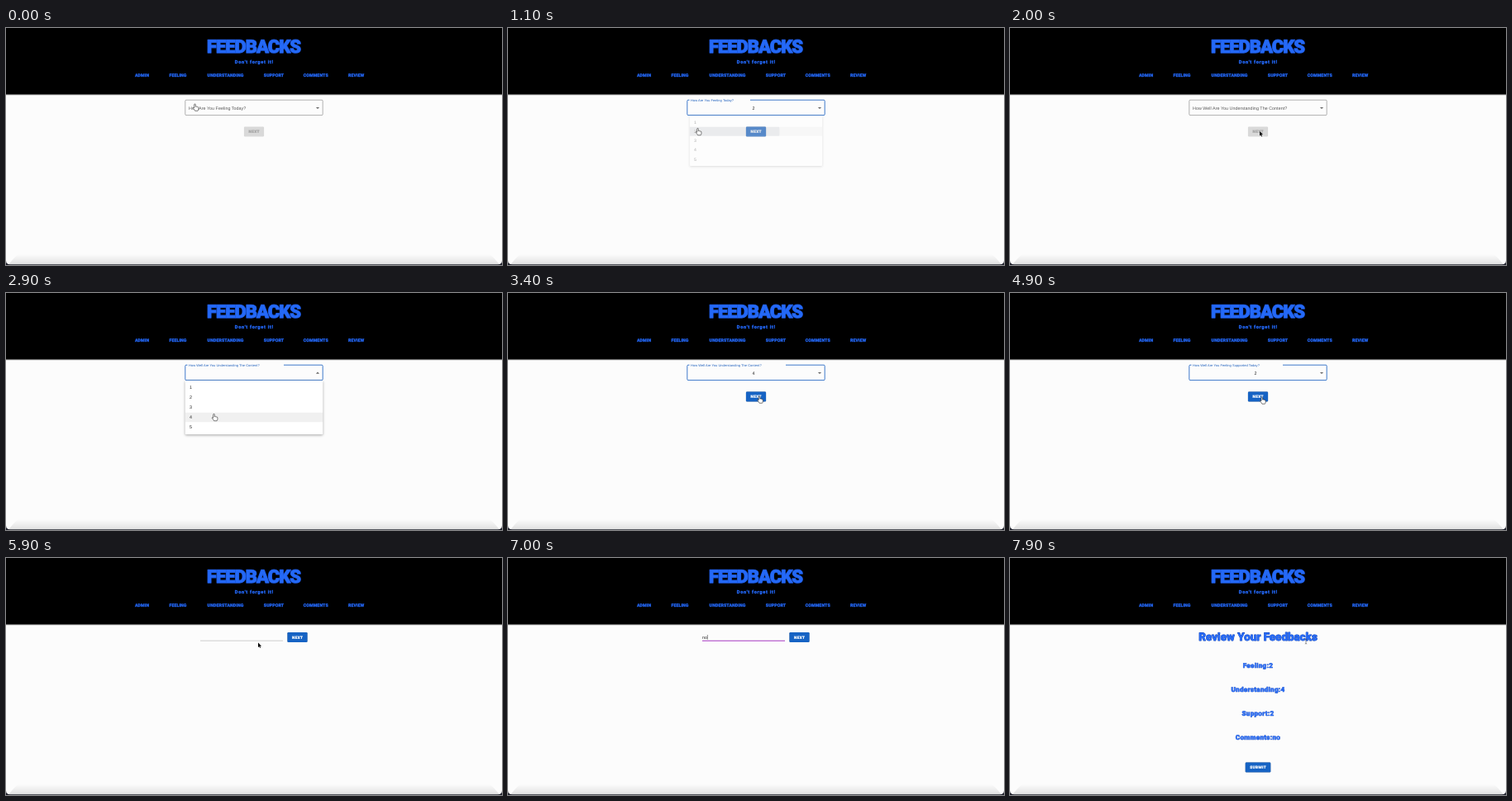
Animation of 600 by 287 pixels, one loop 8 s. Source, as an HTML page:

```html
<!DOCTYPE html>
<html lang="en">
<head>
<meta charset="utf-8">
<title>Feedbacks</title>
<style>
  html, body { margin: 0; width: 100%; height: 100%; overflow: hidden; background: #fcfcfc; }
  svg { display: block; text-rendering: geometricPrecision; }
  text { font: 5.33px "Liberation Sans", Arial, sans-serif; letter-spacing: .05px; }
  .fun { font-family: Roboto, "Open Sans", sans-serif; font-weight: 900; fill: #2469f7;
         stroke: #1c55d6; stroke-width: .3; stroke-linejoin: round; paint-order: stroke; text-anchor: middle; }
  .title { font-size: 22px; letter-spacing: -1px; stroke-width: 1.3; }
  .sub { font-size: 5.6px; letter-spacing: .7px; }
  .nav { font-size: 5.2px; letter-spacing: .12px; }
  .head { font-size: 13.4px; letter-spacing: 0; stroke: #1545b4; stroke-width: .8; }
  .line { font-size: 8.1px; letter-spacing: .28px; stroke: #1545b4; stroke-width: .5; }
  .btn text { font-size: 4.67px; letter-spacing: .4px; fill: #fff; stroke: #fff; stroke-width: .2; }
  .btn rect { fill: #1663c4; filter: drop-shadow(0 .6px .6px rgba(0, 0, 0, .4)); }
  .btn.off rect { fill: #d9d9d9; filter: none; }
  .btn.off text { fill: #a3a3a3; stroke: #a3a3a3; }
  #paper { fill: #fff; filter: drop-shadow(0 1.5px 1.6px rgba(0, 0, 0, .36)); }
</style>
</head>
<body>
<svg id="stage" viewBox="0 0 600 287" width="100%" height="100%">
  <defs>
    <linearGradient id="dock" x2="0" y2="1">
      <stop offset="0" stop-color="#000" stop-opacity="0"/>
      <stop offset="1" stop-color="#000" stop-opacity=".11"/>
    </linearGradient>
    <linearGradient id="edge" x2="0" y2="1">
      <stop offset="0" stop-color="#000" stop-opacity=".45"/>
      <stop offset="1" stop-color="#000" stop-opacity="0"/>
    </linearGradient>
  </defs>
  <rect width="600" height="287" fill="#20222e"/>
  <path d="M0 0H600V281.5Q600 286.3 595 286.3H5Q0 286.3 0 281.5Z" fill="#fcfcfc"/>
  <path d="M14 274H586L597 286.3H3Z" fill="url(#dock)"/>
  <rect y="80" width="600" height="2" fill="url(#edge)"/>
  <rect width="600" height="80.4"/>
  <g id="header">
    <text class="fun title" x="299.5" y="29.6">FEEDBACKS</text>
    <text class="fun sub" x="300.3" y="42.8">Don't forget it!</text>
  </g>

  <g id="rating">
    <path id="frame" fill="none"/>
    <text id="label"></text>
    <text id="value" x="297" y="98.6" text-anchor="middle" fill="#222"></text>
    <path id="caretDown" d="M-2.1 -.9H2.1L0 1.2Z" fill="#666"/>
    <g id="rateBtn" class="btn"></g>
    <g id="menu">
      <rect id="paper" x="216.7" y="106" width="166.6" height="65.2" rx="1.3"/>
      <svg id="row" x="216.7" width="166.6" height="12">
        <rect width="167" height="12" fill-opacity=".06"/>
        <circle id="ripple" cy="6" fill="#0a1a3a" fill-opacity=".16"/>
      </svg>
    </g>
  </g>

  <g id="comments">
    <path d="M235 100.2H335" stroke="#8a8a8a" stroke-width=".4"/>
    <path id="underline" stroke="#b53cd2" stroke-width=".9"/>
    <text id="typed" x="235" y="97.6" fill="#222"></text>
    <path id="bar" stroke="#222" stroke-width=".5"/>
    <g id="sendBtn" class="btn"></g>
  </g>

  <g id="review">
    <text class="fun head" x="300" y="100.3">Review Your Feedbacks</text>
    <g id="submitBtn" class="btn"></g>
  </g>

  <g id="cursor">
    <path id="hand" fill="#fff" stroke="#222" stroke-width=".6" stroke-linejoin="round"
      d="M-.8 .8Q-.8 0 0 0Q.8 0 .8 .8V3.2Q1.6 2.7 2.1 3.3Q3 3 3.3 3.7Q4.4 3.5 4.4 4.6V6Q4.4 7.2 3.6 8.3H.1Q-.6 7 -1.9 5.4Q-2.6 4.6 -2 4.2Q-1.4 4 -.8 4.8Z"/>
    <path id="arrow" d="M0 0V5.6L1.3 4.4L2.2 6.4L3.1 6L2.2 4.1H4Z" stroke="#fff" stroke-width=".5" paint-order="stroke"/>
    <path id="beam" d="M-1.2 -3Q0 -3 0 -2.2Q0 -3 1.2 -3M0 -2.2V2.2M-1.2 3Q0 3 0 2.2Q0 3 1.2 3" fill="none" stroke="#333" stroke-width=".5"/>
  </g>
</svg>
<script>
const LOOP = 8000, STEP = 100;
const COMMENTS = 5100, FOCUS = 6300, REVIEW = 7700;
const pages = [
  { label: "How Are You Feeling Today?", notch: 293, from: 0, open: 200, pick: 1000, value: 2 },
  { label: "How Well Are You Understanding The Content?", notch: 336, from: 1800, open: 2400, pick: 3000, value: 4 },
  { label: "How Well Are You Feeling Supported Today?", notch: 330, from: 3700, open: 3900, pick: 4500, value: 2 }
];
// time, x, y, pointer shape
const moves = [
  [0, 228.5, 92, "hand"], [300, 228.5, 92, "hand"], [800, 229.5, 121.5, "hand"], [1200, 229.5, 121.5, "hand"],
  [1500, 302, 125, "hand"], [1800, 302, 125, "arrow"], [2000, 302, 125, "arrow"], [2300, 302, 97, "hand"],
  [2500, 302, 97, "hand"], [2900, 251.5, 146.5, "hand"], [3100, 251.5, 146.5, "hand"], [3400, 304, 125, "hand"],
  [3700, 304, 125, "arrow"], [3900, 308, 98.5, "arrow"], [4000, 308, 98.5, "arrow"], [4100, 308, 99, "hand"],
  [4400, 305, 123, "hand"], [4600, 305, 123, "hand"], [4900, 304.8, 126, "hand"], [5100, 304.8, 126, "arrow"],
  [5400, 303, 103.5, "arrow"], [5600, 305, 104.5, "arrow"], [5800, 305, 104.5, "arrow"], [6100, 305, 97, "beam"],
  [6500, 305, 97, ""], [7300, 318, 97, "beam"], [7500, 350, 96, "hand"], [7700, 352, 97, "beam"],
  [7900, 358, 101, "beam"]
];

const $ = id => document.getElementById(id);
const set = (el, attrs) => { for (const k in attrs) el.setAttribute(k, attrs[k]); return el; };
const add = (parent, tag, attrs, text = "") => {
  const el = document.createElementNS("http://www.w3.org/2000/svg", tag);
  el.textContent = text;
  return parent.appendChild(set(el, attrs));
};
const show = (el, on) => set(el, { visibility: on ? "visible" : "hidden", display: on ? "inline" : "none" });
const clamp = v => Math.max(0, Math.min(1, v));
const easeOut = (v, power) => 1 - (1 - clamp(v)) ** power;
const mix = (a, b, k) => a + (b - a) * k;

function button(id, cx, y, w, text) {
  add($(id), "rect", { x: cx - w / 2, y, width: w, height: 12.1, rx: 1.3 });
  add($(id), "text", { class: "fun", x: cx + .2, y: y + 7.7 }, text);
}

function build() {
  [["ADMIN", 164.6], ["FEELING", 208], ["UNDERSTANDING", 265.5], ["SUPPORT", 324], ["COMMENTS", 374.8], ["REVIEW", 423.6]]
    .forEach(([name, x]) => add($("header"), "text", { class: "fun nav", x, y: 59 }, name));
  for (let i = 1; i <= 5; i++)
    add($("menu"), "text", { x: 222, y: 104.4 + 12 * i, fill: "#222" }, i);
  const answers = ["Feeling:2", "Understanding:4", "Support:2", "Comments:no"];
  answers.forEach((line, i) => add($("review"), "text", { class: "fun line", x: 300, y: 133.4 + 28.75 * i }, line));
  button("rateBtn", 300, 119.4, 24.2, "NEXT");
  button("sendBtn", 352.5, 90, 24.2, "NEXT");
  button("submitBtn", 300, 247.5, 30.6, "SUBMIT");
}

function pointer(t) {
  let i = moves.length - 1;
  while (moves[i][0] > t) i--;
  const a = moves[i], b = moves[i + 1] || a;
  const k = clamp((t - a[0]) / (b[0] - a[0] || 1));
  const e = k * k * (3 - 2 * k);
  return { x: mix(a[1], b[1], e), y: mix(a[2], b[2], e), shape: a[3] };
}

function drawRating(t, p, pos) {
  const active = t >= p.open, picked = t >= p.pick;
  const shrink = easeOut((t - p.open) / 200, 3);
  const left = active ? 219.5 : 300, right = active ? p.notch : 300;
  set($("frame"), {
    d: `M${right} 87.2H382Q383.2 87.2 383.2 88.4V104.4Q383.2 105.6 382 105.6H218Q216.8 105.6 216.8 104.4V88.4Q216.8 87.2 218 87.2H${left}`,
    stroke: active ? "#1d62c2" : "#666",
    "stroke-width": active ? .85 : .5
  });
  set($("label"), {
    transform: `translate(221 ${mix(98.5, 88.5, shrink)}) scale(${mix(1, .75, shrink)})`,
    fill: active ? "#1d5fbd" : "#555"
  }).textContent = p.label;
  $("value").textContent = picked ? p.value : "";
  set($("caretDown"), { transform: `translate(377 96.8) rotate(${active && !picked ? 180 : 0})` });
  set($("rateBtn"), { class: picked ? "btn" : "btn off" });

  const alpha = easeOut((t - p.open) / 300, 2) * (1 - easeOut((t - p.pick) / 250, 2));
  const grow = 1 - (1 - alpha) * .235;
  show($("menu"), alpha > 0);
  set($("menu"), {
    opacity: alpha,
    transform: `translate(300 106) scale(${mix(.75, 1, grow)} ${mix(.5625, 1, grow)}) translate(-300 -106)`
  });
  const row = picked ? p.value - 1 : Math.floor((pos.y - 108.5) / 12);
  show($("row"), alpha > 0 && row >= 0 && row < 5);
  set($("row"), { y: 108.6 + 12 * row });
  set($("ripple"), { cx: pos.x - 216.7, r: picked ? Math.min(170, t - p.pick) : 0 });
}

function drawComments(t) {
  const word = t >= 7000 ? "no" : t >= 6500 ? "n" : "";
  const half = 50 * easeOut((t - FOCUS + 100) / 200, 2);
  const x = 235.3 + 3.02 * word.length;
  set($("underline"), { d: `M${285 - half} 100.3H${285 + half}` });
  $("typed").textContent = word;
  set($("bar"), { d: `M${x} 93V98.7` });
  show($("bar"), t >= FOCUS);
}

function render(t) {
  const pos = pointer(t);
  const rating = t < COMMENTS, review = t >= REVIEW;
  show($("rating"), rating);
  show($("comments"), !rating && !review);
  show($("review"), review);
  if (rating) drawRating(t, pages.filter(p => t >= p.from).pop(), pos);
  else if (!review) drawComments(t);
  set($("cursor"), { transform: `translate(${pos.x} ${pos.y})` });
  for (const shape of ["hand", "arrow", "beam"]) show($(shape), pos.shape === shape);
}

build();
const start = performance.now();
function tick() {
  const t = (performance.now() - start) % LOOP;
  render(Math.floor(t / STEP) * STEP);
  requestAnimationFrame(tick);
}
render(0);
requestAnimationFrame(tick);
</script>
</body>
</html>
```
